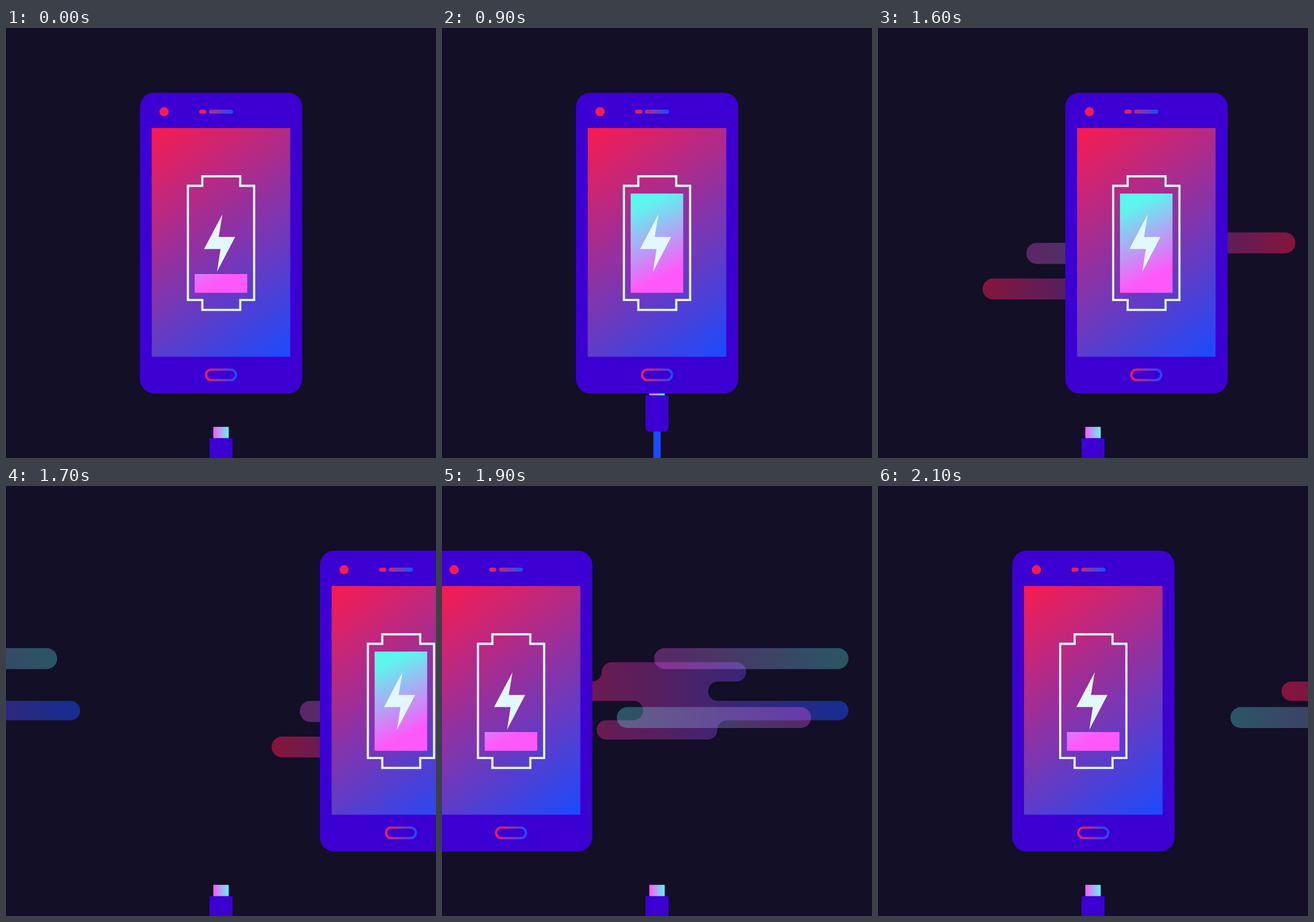
Recreate the animation shown at these times as an HTML page with a canvas. Size 748 by 748 pixels, loop 2.2 s.

```html
<!DOCTYPE html>
<html lang="en">
<head>
<meta charset="utf-8">
<title>Phone charging</title>
<style>
  html, body { margin: 0; width: 100%; height: 100%; overflow: hidden; background: #120f26; }
  canvas { display: block; width: 100vw; height: 100vh; }
</style>
</head>
<body>
<canvas id="stage" width="748" height="748"></canvas>
<script>
const ctx = document.getElementById('stage').getContext('2d');
const SIZE = 748, LOOP = 2200, STEP = 100;
const BG = '#120f26', BODY = '#3c00d2', RED = '#f91b50', BLUE = '#194bff';
const PINK = '#ff58fa', CYAN = '#5cf6ee', WHITE = '#e3f7ff';

const clamp = v => Math.min(1, Math.max(0, v));
const span = (t, from, to) => clamp((t - from) / (to - from));
const ease = u => (1 - Math.cos(Math.PI * u)) / 2;

function gradient(x0, y0, x1, y1, from, to) {
  const g = ctx.createLinearGradient(x0, y0, x1, y1);
  g.addColorStop(0, from);
  g.addColorStop(1, to);
  return g;
}

function rect(x, y, w, h, fill) {
  ctx.fillStyle = fill;
  ctx.fillRect(x, y, w, h);
}

function round(x, y, w, h, r, fill) {
  ctx.beginPath();
  ctx.roundRect(x, y, w, h, r);
  ctx.fillStyle = fill;
  ctx.fill();
}

function shifted(dx, dy, draw) {
  ctx.save();
  ctx.translate(dx, dy);
  draw();
  ctx.restore();
}

// Path pieces: "+" bulges outwards, "-" cuts inwards on a clockwise outline.
function outline(r, text) {
  const arc = (sweep, dx, dy) => `a${r} ${r} 0 0 ${sweep} ${dx * r} ${dy * r} `;
  const parts = {
    '+end': arc(1, 0, 2), '-end': arc(0, 0, 2),
    '+back': arc(1, 0, -2), '-back': arc(0, 0, -2),
    stepOut: arc(1, 1, 1) + arc(0, 1, 1),
    stepIn: arc(0, -1, 1) + arc(1, -1, 1),
    stepUp: arc(0, 1, -1) + arc(1, 1, -1)
  };
  return new Path2D(text.split(' ').map(p => parts[p] || p).join(' '));
}

const tealCloud = outline(18.35,
  'M-83.3,300.3 H1.65 stepOut H73.65 +end H-10 stepIn H-229.65 +back H-180 stepUp H-120 stepUp Z');
const redCloud = outline(16.8,
  'M294.8,306.6 H512.2 +end H479.8 -end H690.2 +end H495.8 stepIn H285.8 +back H333.2 -back H140.8 +back H261.2 stepUp Z');
const battery = new Path2D(
  'M341.5 258H407.5V274.5H431.6V473.2H407.5V490.4H341.5V473.2H316.4V274.5H341.5Z');
const bolt = new Path2D('M376.5 324L370 363.6H398.6L367 424L373.2 384.5H344.5Z');

function cloud(dx, path, x0, x1, from, to, alpha) {
  shifted(dx, 0, () => {
    ctx.globalAlpha = alpha;
    ctx.fillStyle = gradient(x0, 0, x1, 0, from, to);
    ctx.fill(path);
  });
}

function pill(x, y, from, to, alpha) {
  const w = 338, h = 36.4;
  ctx.globalAlpha = alpha;
  round(x, y, w, h, h / 2, gradient(x, 0, x + w, 0, from, to));
  ctx.globalAlpha = 1;
}

function streaks(t) {
  const a = t - 1400, b = t - 1900, s = (t - 1700) / 200;
  pill(-142 + 2.65 * a, 355.6, BLUE, RED, .5);
  pill(462 + 2.8 * (t - 1700), 435.8, RED, BLUE, .5);
  cloud(2.53 * a, tealCloud, -248, 92, PINK, CYAN, .31);
  cloud(2.89 * b, redCloud, 124, 707, RED, BLUE, .5);
  pill(369 + 3.09 * b, 282, PINK, CYAN, .31);
  pill(-345 + 819 * s - 170 * s * s, 384.6, CYAN, PINK, .31);
}

function cable(t) {
  const plugged = ease(span(t, 0, 400)) - ease(span(t, 1300, 1600));
  shifted(0, -74.5 * plugged, () => {
    rect(360.6, 693.8, 26.8, 20, gradient(360.6, 0, 387.4, 0, PINK, CYAN));
    rect(367.7, 770, 12.6, 80, BLUE);
    round(354, 713.4, 40, 63, [0, 0, 7, 7], BODY);
  });
}

function phoneShift(t) {
  if (t < 1800) return 742 * span(t, 1400, 1800) ** 3;
  return .5 - 748 * (1 - span(t, 1800, 2100)) ** 2.66;
}

function phone(t) {
  round(233, 112.4, 282.4, 523.4, 25, BODY);
  round(267, 137.6, 16, 16, 8, RED);
  const accent = gradient(336, 0, 395, 0, RED, BLUE);
  round(336, 142, 12.6, 7, 3.5, accent);
  round(353, 142, 42, 7, 3.5, accent);
  rect(253.5, 174, 241, 397.8, gradient(240, 183, 508, 563, RED, BLUE));

  ctx.beginPath();
  ctx.roundRect(348, 594.2, 52, 18.2, 9.1);
  ctx.strokeStyle = gradient(346, 0, 402, 0, RED, BLUE);
  ctx.lineWidth = 4;
  ctx.stroke();

  const level = t < 1800 ? ease(span(t, 400, 900)) : 0;
  const top = 428 - 140 * level;
  rect(328.2, top, 91.4, 460.6 - top, gradient(350, 308, 405, 423, CYAN, PINK));
  ctx.strokeStyle = WHITE;
  ctx.lineWidth = 3.8;
  ctx.stroke(battery);
  ctx.fillStyle = WHITE;
  ctx.fill(bolt);
}

function draw(t) {
  rect(0, 0, SIZE, SIZE, BG);
  streaks(t);
  cable(t);
  shifted(phoneShift(t), 0, () => phone(t));
}

const start = performance.now();
function tick() {
  const t = (performance.now() - start) % LOOP;
  draw(Math.floor(t / STEP) * STEP);
  requestAnimationFrame(tick);
}
tick();
</script>
</body>
</html>
```
